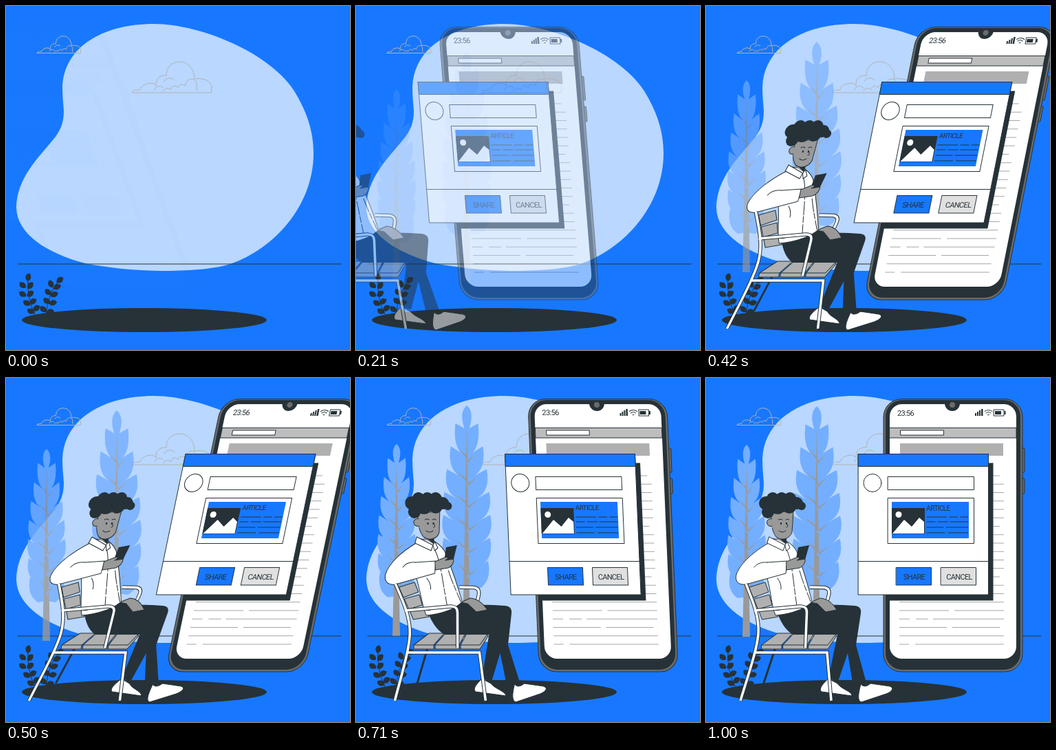
An HTML page that plays this animation: 500 by 500 pixels, repeating every 1.04 s.

```html
<!DOCTYPE html>
<html lang="en">
<head>
<meta charset="utf-8">
<title>Sharing an article</title>
<style>
  html, body { margin: 0; height: 100%; overflow: hidden; background: #1778ff; }
  svg { display: block; width: 100vw; height: 100vh; }
  text { font: 11px Roboto, "Open Sans", sans-serif; letter-spacing: -.06em; fill: #263238; }
  .dark { fill: #263238; }
  .skin { fill: #999; }
  .ink { stroke: #263238; stroke-linejoin: round; stroke-linecap: round; }
  .white { fill: #fff; }
  .none { fill: none; }
</style>
</head>
<body>
<svg viewBox="0 0 500 500">
  <defs>
    <g id="cloud" fill="none" stroke="#b2b2b2">
      <path vector-effect="non-scaling-stroke" d="M183 126c1-4 7-4 12-4 1-8 18-14 23-6-1-10 6-16 15-15 0-12 8-20 19-20 14 0 22 12 22 25 14-2 25 3 25 13l-1 7H183M230 110c2-6 11-7 15-2M216 122c1-6 9-7 13-3M229 124c1-5 8-6 10-2 2-6 8-8 11-3 1-6 7-6 10-3 3-13 17-13 17-1v8"/>
    </g>
  </defs>

  <path fill="#b9d7ff" d="M215 26C285 26 395 72 425 134C437 156 447 182 447 214C447 290 390 353 326 375C300 383 262 385 224 385C180 384 145 380 115 374C62 360 16 333 15 293C16 250 46 222 67 196C81 180 84 167 84 152C83 140 82 130 82 118C84 60 140 26 215 26Z"/>
  <use href="#cloud"/>
  <use href="#cloud" transform="translate(45 68.5) scale(.55) translate(-183 -126)"/>
  <path class="ink" d="M17 375H487"/>
  <ellipse class="dark" cx="201" cy="456.500" rx="178" ry="17.500"/>
  <g id="plants" class="dark"></g>
  <g id="trees"></g>

  <g id="device">
    <rect x="459" y="102" width="4" height="35" rx="1.500" fill="#6b6b6b" class="ink"/>
    <rect x="459" y="146" width="4" height="22" rx="1.500" fill="#6b6b6b" class="ink"/>
    <rect x="258" y="30.500" width="202" height="396.500" rx="26" fill="#6b6b6b" class="ink"/>
    <rect class="dark" x="261" y="32" width="196" height="392" rx="24"/>
    <rect class="white" x="267" y="38" width="184" height="370" rx="18"/>
    <path class="dark" d="M347 37H369A11 11 0 0 1 347 37z"/>
    <circle cx="358" cy="39" r="4" fill="#6b6b6b"/>
    <text x="278" y="54.500" font-size="9.500">23:56</text>
    <path class="dark" d="M391 51h2v4h-2zM394 49h2v6h-2zM397 47h2v8h-2zM400 45h2.500v10h-2.500zM420 48h9v5h-9zM433.500 48h2v5h-2z"/>
    <path class="ink none" d="M405 48.500q5.500-4 11 0M407 51q3.500-3 7 0M409.500 53.500h2M418.500 46h14.500v9h-14.500z"/>
    <path class="ink" fill="#bdbdbd" d="M267 72.500H451V87H267z"/>
    <path class="ink white" d="M283 76H345.500V83H283z"/>
    <path fill="#b0b0b0" d="M282 95H432V113H282z"/>
    <g id="lines" stroke="#a6a6a6"></g>

    <path class="dark" d="M262 123.500H417.500V323.500H262z"/>
    <path class="ink white" d="M221.500 110.500H410.500V315H221.500z"/>
    <path class="ink" fill="#1778ff" d="M221.500 110.500H410.500V128.500H221.500z"/>
    <circle class="ink none" cx="242" cy="152.500" r="13"/>
    <path class="ink none" d="M264.500 143.500H389.500V162.500H264.500zM264.500 174.500H389.500V240.500H264.500zM221.500 266.500H410.500"/>
    <path fill="#1778ff" d="M270 180H382V233H270z"/>
    <path class="dark" d="M270 189H318V226.500H270z"/>
    <circle class="white" cx="280" cy="198.500" r="4.500"/>
    <path class="white" d="M271 226L288 206 299 216 310 203 317 209V226z"/>
    <text x="337.500" y="192.500" style="font-size: 10px" text-anchor="middle">ARTICLE</text>
    <path class="ink none" d="M321 202H350M354 202H366M370 202H381M321 209H333M337 209H352M355 209H381M321 217H345M349 217H381M321 225H347M352 225H381"/>
    <path class="ink" fill="#1778ff" d="M276.500 275.500H327.500V301H276.500z"/>
    <path class="ink" fill="#e0e0e0" d="M341.500 275.500H392.500V301H341.500z"/>
    <text x="302.500" y="293" text-anchor="middle">SHARE</text>
    <text x="368" y="293" text-anchor="middle">CANCEL</text>
  </g>

  <g id="man">
    <path class="ink none" stroke-width="3" d="M100 395L84 443"/>
    <g class="ink" fill="#b0b0b0">
      <path d="M63 304L86 297 91 311 69 319zM70 321L92 315 96 330 76 336zM77 338L97 333 105 347 82 351z"/>
      <path d="M81 388L104 371H126L110 388V394H81zM112 388L128 371H157L147 388V394H112zM149 388L159 371H189V376L177 394H149z"/>
      <path class="none" d="M81 388H177L189 372"/>
    </g>
    <g class="tube"><path d="M151 304L172 304.500C181 306 180 312 176 324"/></g>

    <path class="ink white" d="M178 437L191 444C197 453 212 455 212 462L168 456C163 452 171 443 178 437z"/>
    <path class="ink white" d="M225 445C229 450 235 448 239 444L267 448C273 450 272 455 262 459L226 471C219 470 222 456 225 445z"/>
    <path class="dark" d="M104 343L152 326C170 331 195 329 216 331C224 332 226 336 225 342L218 388 233 443 214 449 206 400 192 441 178 437 191 373H126C114 365 109 354 104 343z"/>
    <path class="ink skin" d="M152 326L166 320C177 321 184 327 190 337L174 340 162 328z"/>
    <path class="ink white" d="M92 233C84 250 84 275 90 295C95 315 95 330 101 345C125 343 145 335 154 325C148 300 140 275 133 255C130 246 123 241 117 237z"/>
    <path class="skin" d="M100 222L117 230 117 242 103 234z"/>
    <path class="dark" d="M105 232Q112 236 117 232V242z"/>
    <path class="ink white" d="M92 231L115 243 112 251 89 240zM115 243L118 238 122 247 117 251z"/>
    <path class="ink none" d="M118 251C126 270 127 300 132 331M136 280C140 295 146 309 152 325" stroke-dasharray="20 2 9 3"/>
    <path class="ink none" d="M99 337q6 2 10-1M104 291q6 8 5 16"/>
    <path class="white" d="M89 241L72 254 68 275 96 275z"/>
    <path class="ink white" d="M89 241C72 251 50 268 44 286C42 296 47 301 58 300L116 284 118 266 89 268"/>
    <path class="ink none" d="M89 268C79 267 73 271 70 275"/>
    <path class="dark" d="M134 246L150 243 144 264 130 268z"/>
    <path class="ink skin" d="M117 267L131 261C137 259 137 263 132 265L144 263C145 268 141 274 136 276L117 279z"/>

    <path class="ink skin" d="M95 196C94 210 96 224 102 231C110 237 122 234 125 224L127 194z"/>
    <g id="hair" class="dark"></g>
    <circle class="ink skin" cx="94" cy="210" r="5.500"/>
    <path class="skin" d="M96 204h6v14h-6z"/>
    <path class="ink none" d="M117 211q4 5 0 6M106 222q5 4 10 0M105 206q3-2 6 0M116 206q3-2 5 0"/>
    <path class="dark" d="M108 210h2v3h-2zM116 210h2v3h-2z"/>

    <g class="tube">
      <path d="M58 299C66 320 78 345 76 372C74 395 62 430 50 469"/>
      <path d="M70 338L136 332Q147 331 146.500 341L144.500 392"/>
      <path d="M72 399H176L182 469"/>
    </g>
  </g>
</svg>
<script>
const $ = id => document.getElementById(id);

// Plants: each leaf is [x, y, angle]
const leaves = [
  [32, 394, 8], [24, 406, -50], [35, 406, 35], [24, 419, -60], [35, 418, 50], [30, 432, -60], [39, 429, 55],
  [36, 444, -65], [44, 439, 50], [78, 398, 50], [65, 404, -25], [74, 408, 65], [61, 416, -50], [70, 419, 65],
  [59, 429, -55], [68, 431, 75], [54, 441, -55], [64, 444, 75]
];
$('plants').innerHTML =
  '<path class="ink none" d="M42 448Q30 425 32 396M58 448Q62 415 77 399"/>' +
  leaves.map(([x, y, a]) => `<path transform="translate(${x} ${y}) rotate(${a})" d="M0 6C-6 1-4-4 1-6C6-2 5 4 0 6z"/>`).join('');

// Feathered tree: a rounded tip, then rows of upward teeth around a tapering trunk
function tree(cx, top, bottom, width) {
  const rows = 8, step = (bottom - top) / rows;
  const reach = i => width * Math.sin(Math.PI * (.08 + i * .08));
  let foliage = '', branches = '';
  for (const side of [-1, 1]) {
    foliage += `M${cx} ${top}Q${cx + side * width * .32} ${top + step * .3} ${cx + side * width * .1} ${top + step}`;
    for (let i = 1; i < rows; i++) {
      const r = reach(i) * side, y = top + i * step;
      foliage += `L${cx + r * .95} ${y - 7}Q${cx + r * 1.15} ${y + step * .7} ${cx + r * .5} ${y + step + 2}`;
      if (i > 1) branches += `M${cx} ${y + 15 + side * 4}L${cx + r * .5} ${y + side * 4}L${cx} ${y + 11 + side * 4}z`;
    }
    foliage += `L${cx} ${bottom}z`;
  }
  return `<path fill="#74aeff" d="${foliage}"/>
    <path fill="#999" d="${branches}M${cx} ${top + 28}L${cx + 5} 376H${cx - 6}z"/>`;
}
$('trees').innerHTML = tree(59, 97, 318, 28) + tree(161, 41, 307, 36);

// Page text on the phone
const dashes = ['', '72 8', '15 9 18 7 200', '69 8', '', '14 9 200'];
for (let i = 0; i < 21; i++) {
  const y = 142 + i * 12.25;
  $('lines').innerHTML += `<path d="M281 ${y}H433" stroke-dasharray="${dashes[(i + 3) % 6]}"/>`;
}

const curls = [[87, 182, 10], [97, 175, 9], [110, 175, 9], [122, 175, 9], [132, 182, 9], [139, 186, 6],
  [90, 195, 9], [104, 186, 12], [121, 187, 10]];
$('hair').innerHTML = curls.map(([x, y, r]) => `<circle cx="${x}" cy="${y}" r="${r}"/>`).join('');

// Bench tubing: a dark outline under a white core
for (const g of document.querySelectorAll('.tube')) {
  g.setAttribute('fill', 'none');
  const paths = g.innerHTML;
  g.innerHTML = `<g stroke="#263238" stroke-width="5.500">${paths}</g><g stroke="#fff" stroke-width="3.500">${paths}</g>`;
}

// cubic-bezier(.36, -.01, .5, 1.38)
function ease(x) {
  if (x >= 1) return 1;
  const curve = (s, a, b) => 3 * (1 - s) ** 2 * s * a + 3 * (1 - s) * s * s * b + s ** 3;
  let lo = 0, hi = 1;
  for (let i = 0; i < 30; i++) {
    const mid = (lo + hi) / 2;
    if (curve(mid, .36, .5) < x) lo = mid; else hi = mid;
  }
  return curve(lo, -.01, 1.38);
}

// Keyframes: time, x shift, skew in degrees, opacity
const keys = [[0, -250, 20, 0], [.6, 0, -10, 1], [.8, 0, 2, 1], [1, 0, 0, 1]];
function speedIn(t) {
  const i = t < .6 ? 0 : t < .8 ? 1 : 2, from = keys[i], to = keys[i + 1];
  const p = ease((t - from[0]) / (to[0] - from[0]));
  return [1, 2, 3].map(k => from[k] + (to[k] - from[k]) * p);
}

const LOOP = 1040, STEPS = 25;
const clamp = v => Math.min(1, Math.max(0, v));

function draw(now) {
  const step = Math.min(STEPS - 1, Math.floor((now % LOOP + 5) * 24 / 1000));
  const t = step / 24;
  const time = Math.min(1, t + .025 + Math.max(0, t - .3) * .03);

  const [x, skew, alpha] = speedIn(time);
  const k = Math.tan(skew * Math.PI / 180);
  for (const [id, cy] of [['device', 229], ['man', 318]]) {
    $(id).setAttribute('transform', `matrix(1 0 ${k} 1 ${x - k * cy} 0)`);
    $(id).style.opacity = clamp(alpha);
  }

  const rise = ease(time);
  $('trees').setAttribute('transform', `translate(0 ${30 * (1 - rise)})`);
  $('trees').style.opacity = clamp(rise);
}

const start = performance.now();
function tick() {
  draw(performance.now() - start);
  requestAnimationFrame(tick);
}
tick();
</script>
</body>
</html>
```
